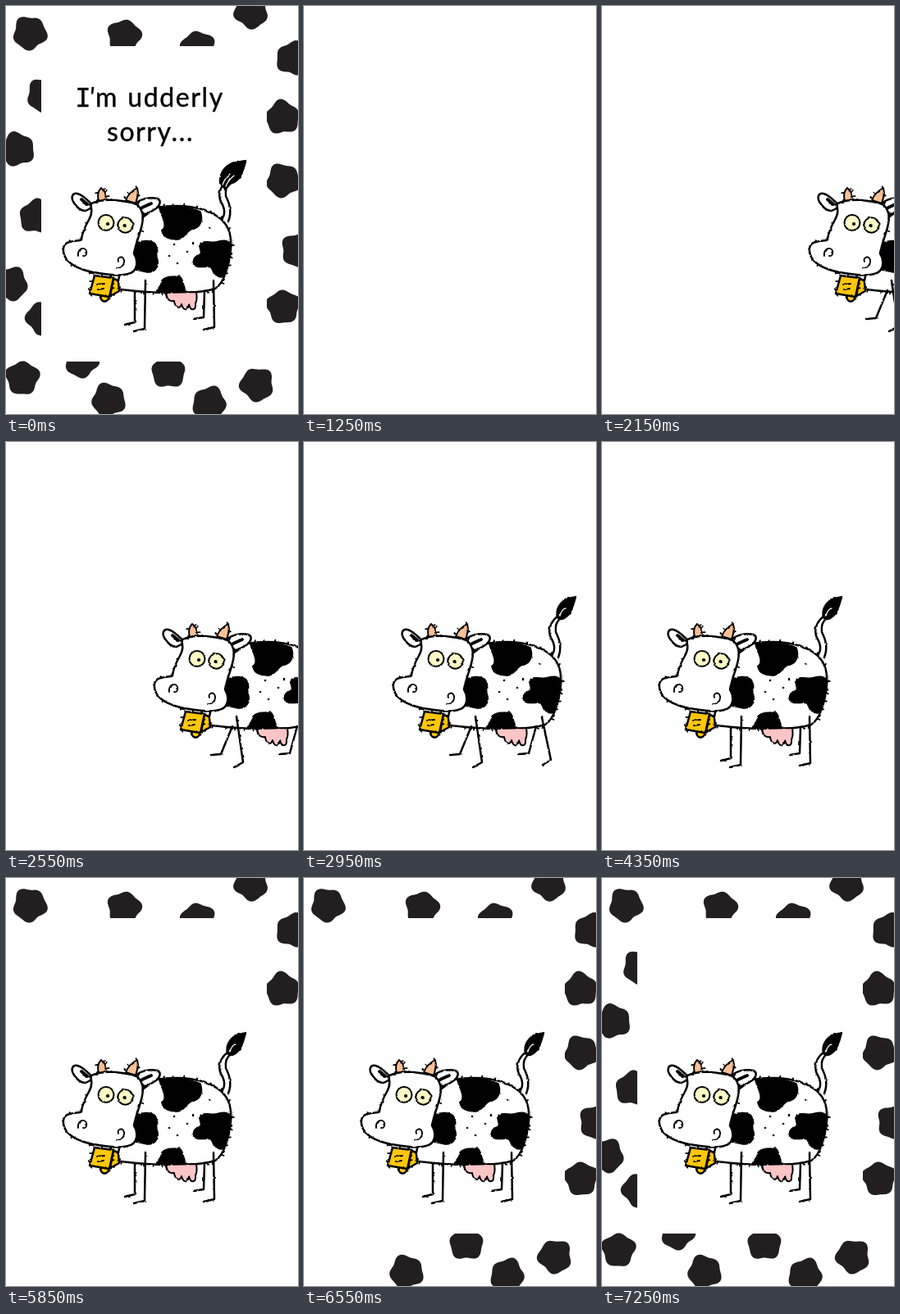
Animation of 356 by 498 pixels, one loop 8 s. Source, as an HTML page:

```html
<!DOCTYPE html>
<html lang="en">
<head>
<meta charset="utf-8">
<title>Sorry cow</title>
<style>
  html, body { margin: 0; width: 100%; height: 100%; overflow: hidden; background: #fff; }
  svg { display: block; width: 100%; height: 100%; }
  .ink { fill: none; stroke: #000; stroke-width: 2.5; stroke-linecap: round; stroke-linejoin: round; }
  .white { fill: #fff; }
  .black { fill: #000; }
  .horn { fill: #f8c096; stroke-width: 1.9; }
  .eye { fill: #fbf9c6; stroke-width: 2; }
  .bell { fill: #ffc60a; }
  .udder { fill: #fbc5c6; stroke-width: 2; }
  .thin { stroke-width: 1.8; }
  .streak { stroke: #fff; stroke-width: 1.3; }
  text { font: 32px Lato, sans-serif; letter-spacing: 1.6px; text-anchor: middle;
         fill: #000; stroke: #000; stroke-width: .4; stroke-linejoin: round; }
  .cap { font-family: "DejaVu Sans Mono", monospace; letter-spacing: 0; }
  .slant { font-style: italic; }
</style>
</head>
<body>
<svg viewBox="0 0 356 498">
  <filter id="rough" x="-10%" y="-10%" width="120%" height="120%" color-interpolation-filters="sRGB">
    <feTurbulence type="fractalNoise" baseFrequency=".16" numOctaves="2" seed="4"/>
    <feDisplacementMap in="SourceGraphic" scale="2.4" xChannelSelector="R" yChannelSelector="G"/>
  </filter>

  <g id="spots" fill="#231f20"></g>
  <rect x="43" y="49" width="275" height="385" fill="#fff"/>

  <g id="words">
    <text class="cap" x="94" y="123">I</text>
    <text x="119" y="123"><tspan class="slant">'</tspan>m</text>
    <text x="207" y="123">udderly</text>
    <text x="176" y="165">sorry...</text>
  </g>

  <g id="cow"><g class="ink" filter="url(#rough)">
    <!-- tail -->
    <path d="M262 262C268 255 267 247 262 239C258 230 261 220 270 213M271 263C276 250 272 240 268 232C267 224 270 218 274 215"/>
    <path class="black" d="M270 214C268 204 273 196 281 192L292 189C290 196 288 206 283 211C279 215 274 218 270 214Z"/>
    <path class="streak" d="M273 212C274 208 276 205 279 203"/>
    <g id="bushy">
      <path class="black" d="M261 215C261 204 267 196 276 192L292 189C290 198 287 207 281 211C275 215 271 219 267 224Z"/>
      <path class="streak" d="M264 218C266 213 268 209 273 205M268 220C270 215 273 211 278 207"/>
    </g>

    <!-- body -->
    <path class="white" data-hair="13" d="M183 246C215 241 243 246 258 257C270 265 275 278 274 293C272 317 267 337 255 345C235 351 205 351 190 350C170 349 150 348 135 345L150 270Z"/>
    <g class="black" stroke-width="1.4">
      <path d="M187 247C200 242 225 245 237 251C241 261 237 270 229 272C221 272 220 283 210 285C200 286 188 281 191 273C197 267 189 256 187 247Z"/>
      <path d="M160 289C168 285 181 286 183 292C185 299 182 304 185 310C187 320 180 326 172 325L154 321Z"/>
      <path d="M236 290C243 284 252 291 260 287C268 285 274 287 275 292C274 310 271 320 266 330C258 334 252 325 250 319C243 316 236 322 229 316C226 309 232 304 237 303C239 298 234 294 236 290Z"/>
      <path d="M183 350C184 344 190 342 190 335C195 329 205 330 212 330C217 334 214 339 221 350Z"/>
    </g>
    <path d="M205 291h.1M228 290h.1M221 300h.1M199 305h.1M209 314h.1M248 271h.1"/>
    <path class="udder" d="M195 350C195 357 199 361 205 360C206 368 212 371 214 364C216 372 222 373 223 364C225 373 232 372 231 363C234 357 232 352 232 349Z"/>

    <!-- legs -->
    <path id="stand" d="M157 349L157 386L145 389M170 335L169 394L156 397M242 348L241 380L229 382M253 336L254 392L241 395"/>
    <path id="stride" d="M165 347L151 381L139 382M170 335L178 391L167 397M244 347L235 380L223 381M251 336L262 388L252 394"/>

    <!-- bell -->
    <path class="bell" d="M115 352C114 362 124 364 126 354ZM131 332L137 336L138 348L127 354Z"/>
    <path class="bell" data-hair="9" d="M108 329L131 332L126 355L102 351Z"/>
    <path class="thin" d="M111 340l9-1M112 346l7-1"/>

    <!-- horns and ears -->
    <path class="horn" data-hair="8" d="M113 238C111 231 112 226 116 222C121 226 122 232 124 238Z"/>
    <path class="horn" data-hair="8" d="M146 237C149 230 154 225 160 222C162 229 160 235 158 241Z"/>
    <path class="white" d="M105 243C100 238 95 231 87 229C81 228 79 233 82 239C86 245 90 250 97 250L105 246"/>
    <path class="white" d="M158 241C163 236 175 233 184 235C190 237 188 243 183 247C176 252 168 256 163 253"/>
    <path stroke-width="4" d="M92 236L99 242M166 246L177 241"/>

    <!-- head -->
    <path class="white" data-hair="30" d="M102 242C108 239 120 236 133 237C143 238 152 239 159 242C166 247 168 256 166 266C163 280 158 290 156 302C161 310 161 322 152 326C140 331 120 327 106 325C92 322 76 317 71 304C68 295 71 289 78 288C84 286 90 287 92 285C93 277 97 268 101 261C105 254 105 247 102 242Z"/>
    <circle class="eye" cx="122" cy="264.500" r="9.500"/>
    <circle class="eye" cx="145.500" cy="267.500" r="9.200"/>
    <path stroke-width="4.200" d="M124 266h.1M144.500 268h.1"/>
    <path class="thin" d="M88 305C87 299 91 295 95 296C100 298 99 306 94 305M137 312C135 307 141 305 143 308C146 313 142 320 135 320"/>
  </g></g>
</svg>

<script>
  const LOOP = 8000, CLEAR = 1250, WALK = 1750, STEP = 200, LAST_STEP = 8, SETTLE = 4350;
  const SPOTS = 5350, GAP = 100;
  const byId = id => document.getElementById(id);
  const show = (el, on) => el.setAttribute('visibility', on ? 'inherit' : 'hidden');

  let seed = 7;
  const random = () => (seed = seed * 16807 % 2147483647) / 2147483647;

  function addPath(parent, d) {
    const path = document.createElementNS('http://www.w3.org/2000/svg', 'path');
    path.setAttribute('d', d);
    return parent.appendChild(path);
  }

  // A lumpy disc; the turn varies from one to the next
  function blob([x, y], i) {
    const points = Array.from({ length: 60 }, (_, k) => {
      const a = k * Math.PI / 30;
      const r = 20 + 1.6 * Math.cos(5 * a - 1.5 + 2 * i) + Math.cos(3 * a + i);
      return `${(x + r * Math.cos(a)).toFixed(1)} ${(y + r * Math.sin(a)).toFixed(1)}`;
    });
    return `M${points.join('L')}Z`;
  }

  // Short bristles along the outside of a clockwise outline
  function addHair(outline) {
    const gap = +outline.dataset.hair;
    let d = '';
    for (let s = gap * random(); s < outline.getTotalLength(); s += gap * (.5 + random())) {
      const p = outline.getPointAtLength(s), q = outline.getPointAtLength(s + .5);
      const along = 4 * random() - 2, out = 1.5 + 2 * random();
      const tx = (q.x - p.x) * 2, ty = (q.y - p.y) * 2;
      d += `M${p.x} ${p.y}l${along * tx + out * ty} ${along * ty - out * tx}`;
    }
    const hair = addPath(outline.parentNode, d);
    hair.setAttribute('class', 'thin');
    outline.after(hair);
  }

  // Clockwise from the top left
  const places = [
    [29, 33], [144, 37], [234, 51], [299, 7], [350, 64], [337, 136], [338, 213], [356, 298], [338, 367],
    [306, 462], [248, 485], [198, 446], [125, 481], [92, 433], [20, 454], [45, 381], [6, 339], [37, 257],
    [14, 175], [46, 109]
  ];
  const spots = places.map((place, i) => addPath(byId('spots'), blob(place, i)));
  document.querySelectorAll('[data-hair]').forEach(addHair);
  const [cow, words, bushy, stand, stride] = ['cow', 'words', 'bushy', 'stand', 'stride'].map(byId);

  function draw(t) {
    const intro = t < CLEAR;
    const walking = t >= WALK && t < SETTLE;
    const n = Math.min(Math.floor((t - WALK) / STEP), LAST_STEP);
    const striding = walking && n % 2 === 0;
    const x = walking ? 36 * (LAST_STEP - 1 - n) + (striding ? 3 : 0) : 0;

    cow.setAttribute('transform', `translate(${x} 0)`);
    show(cow, intro || t >= WALK);
    show(words, intro);
    show(bushy, intro);
    show(stride, striding);
    show(stand, !striding);
    spots.forEach((spot, i) => show(spot, intro || t >= SPOTS + i * GAP));
  }

  const start = performance.now();
  function tick() {
    draw((performance.now() - start) % LOOP);
    requestAnimationFrame(tick);
  }
  draw(0);
  requestAnimationFrame(tick);
</script>
</body>
</html>
```
